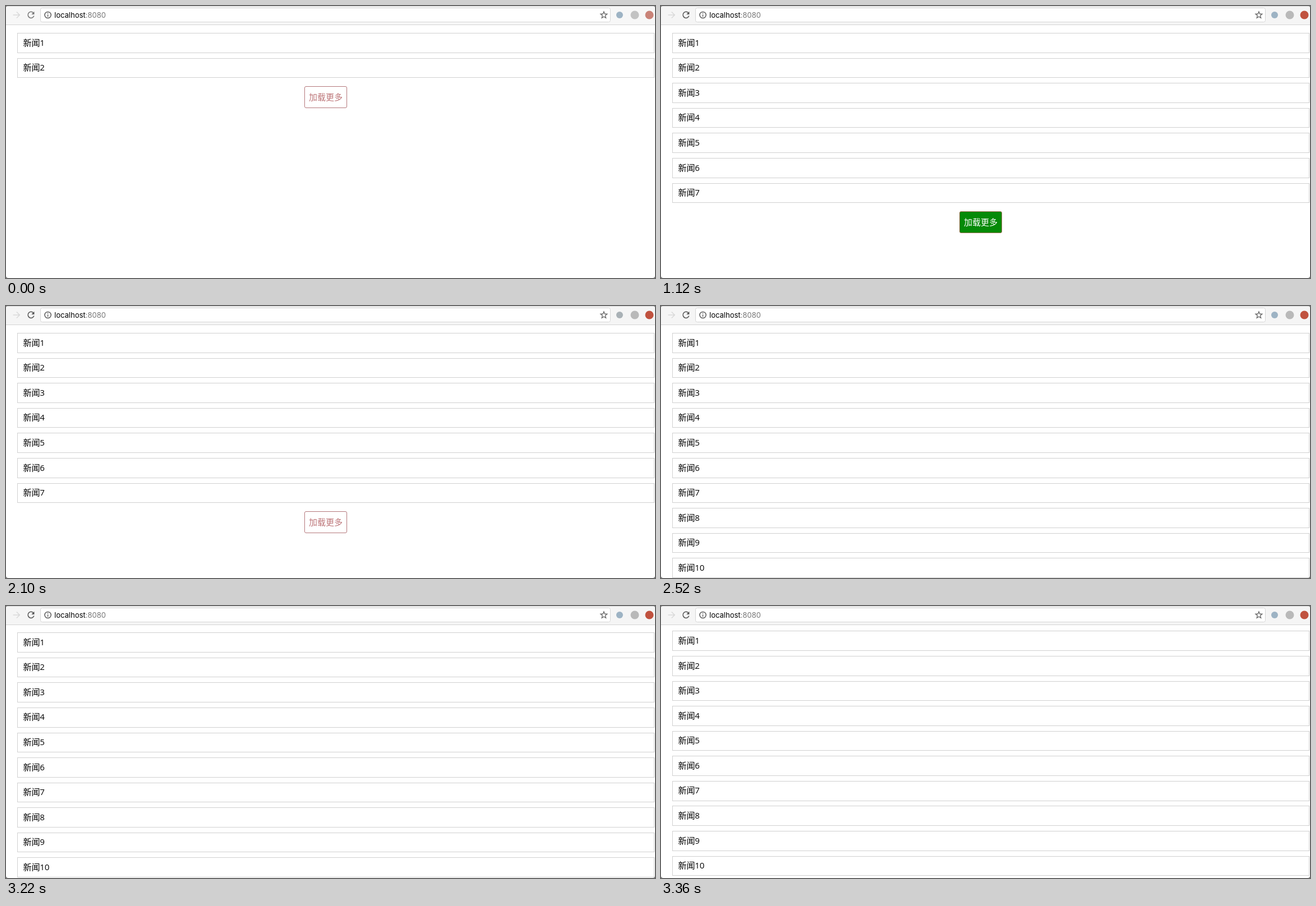
An HTML page for the animation above (3.43 s loop, 1155 by 485 pixels).

```html
<!DOCTYPE html>
<html lang="zh">
<head>
<meta charset="utf-8">
<title>加载更多</title>
<style>
  html, body { margin: 0; width: 100%; height: 100%; overflow: hidden; background: #fff; }
  svg { display: block; }
  .cjk { font: 15px "Noto Sans CJK SC", "Noto Sans CJK", sans-serif; }
  .digit { font: 15px "Open Sans", "Noto Sans", sans-serif; }
  .url { font: 13px Inter, Roboto, sans-serif; }
  .icon { fill: none; stroke-width: 1.5; }
</style>
</head>
<body>
<svg width="1155" height="485" viewBox="0 0 1155 485">
  <rect width="1155" height="485" fill="#fff"/>
  <g id="list"></g>
  <g id="button">
    <rect id="buttonBox" x="531.5" y="143.5" width="75" height="38" rx="2.5"/>
    <text id="buttonText" class="cjk" x="539" y="167.8">加载更多</text>
  </g>

  <rect id="toolbar" width="1155" height="33"/>
  <rect y="33" width="1155" height="1" fill="#d4d4d4"/>
  <rect width="1155" height="1" fill="#d6d6d6"/>
  <path class="icon" stroke="#d9d9d9" d="M12.5 16H24M18.8 10.5L24.3 16L18.8 21.5"/>
  <g id="reload">
    <path class="icon" d="M48.6 12.1A5.5 5.5 0 1 0 49.8 17.6"/>
    <path stroke="none" d="M50.4 9.8V15H45.2Z"/>
  </g>
  <rect x="61.5" y="3.5" width="1014" height="25" rx="3" fill="#fff" stroke="#d6d6d6"/>
  <circle class="icon" cx="74.5" cy="16" r="5.6" stroke="#5c5c5c" stroke-width="1.3"/>
  <path d="M74.5 12.6V14.1M74.5 15.2V19.3" stroke="#5c5c5c" stroke-width="1.4"/>
  <text class="url" x="86" y="20.8" fill="#000">localhost<tspan fill="#777">:8080</tspan></text>
  <path id="star" fill="none" stroke="#666" stroke-width="1.3"/>
  <circle id="blueIcon" cx="1092" cy="16" r="6"/>
  <circle id="grayIcon" cx="1119" cy="16" r="7.5"/>
  <circle id="redIcon" cx="1145" cy="16" r="7.5"/>
  <path fill="#666" d="M0 0H3Q0 0 0 3ZM1155 0V3Q1155 0 1152 0ZM0 485V481Q0 485 4 485ZM1155 485H1151Q1155 485 1155 481Z"/>
</svg>
<script>
const LOOP = 3430, STEP = 70;
const ROW_TOP = 48.6, ROW_PITCH = 44.58, ROW_HEIGHT = 34.6;
const byId = id => document.getElementById(id);

function add(parent, name, attrs, text = "") {
  const node = document.createElementNS("http://www.w3.org/2000/svg", name);
  setAttrs(node, attrs);
  node.textContent = text;
  return parent.appendChild(node);
}

function setAttrs(node, attrs) {
  for (const key in attrs) node.setAttribute(key, attrs[key]);
}

const rows = Array.from({ length: 12 }, (_, i) => {
  const group = add(byId("list"), "g", {});
  return {
    group,
    box: add(group, "rect", { x: 20.5, width: 1133, fill: "#fff", stroke: "#d0d0d0" }),
    label: add(group, "text", { class: "cjk", x: 30.5 }, "新闻"),
    number: add(group, "text", { class: "digit", x: 60.3 }, i + 1),
  };
});

const starPoints = Array.from({ length: 10 }, (_, i) => {
  const angle = i * Math.PI / 5 - Math.PI / 2, radius = i % 2 ? 2.7 : 6.2;
  return `${1064 + radius * Math.cos(angle)} ${16.2 + radius * Math.sin(angle)}`;
});
byId("star").setAttribute("d", `M${starPoints.join("L")}Z`);

function drawRows(count, scroll) {
  rows.forEach(({ group, box, label, number }, i) => {
    group.style.display = i < count ? "" : "none";
    const top = ROW_TOP + i * ROW_PITCH - scroll;
    const y = Math.floor(top);
    setAttrs(box, { y: y + 0.5, height: Math.floor(top + ROW_HEIGHT) - y });
    label.setAttribute("y", top + 22);
    number.setAttribute("y", top + 22);
  });
}

function drawButton(count, hover) {
  byId("button").style.display = count > 7 ? "none" : "";
  byId("button").setAttribute("transform", `translate(0 ${Math.round((count - 2) * ROW_PITCH)})`);
  setAttrs(byId("buttonBox"), hover
    ? { fill: "#058a08", stroke: "#a4745a" }
    : { fill: "#fff", stroke: "#b4777b" });
  setAttrs(byId("buttonText"), hover
    ? { fill: "#fff", "font-weight": 500 }
    : { fill: "#bd7679", "font-weight": 400 });
  byId("buttonText").style.fontWeight = hover ? 500 : 400;
}

function drawToolbar(time) {
  const awake = time >= 490;
  byId("toolbar").setAttribute("fill", awake ? "#f5f5f5" : "#f7f7f7");
  setAttrs(byId("reload"), awake ? { stroke: "#555", fill: "#555" } : { stroke: "#777", fill: "#777" });
  byId("blueIcon").setAttribute("fill", time >= 2030 && time < 2520 ? "#a9b1b6" : "#9db3c4");
  byId("grayIcon").setAttribute("fill", awake ? "#b9b9b9" : "#c3c3c3");
  byId("redIcon").setAttribute("fill", awake ? "#c0523f" : "#c98378");
}

function render(now) {
  const time = Math.floor((now % LOOP) / STEP) * STEP;
  const count = time < 1050 ? 2 : time < 2520 ? 7 : 12;
  const hover = (time >= 910 && time < 1680) || time >= 2240;
  const scrollSteps = Math.max(0, (time - 3080) / STEP);
  drawRows(count, 0.23 * scrollSteps ** 2);
  drawButton(count, hover);
  drawToolbar(time);
}

const start = performance.now();
function tick() {
  render(performance.now() - start);
  requestAnimationFrame(tick);
}
tick();
</script>
</body>
</html>
```
